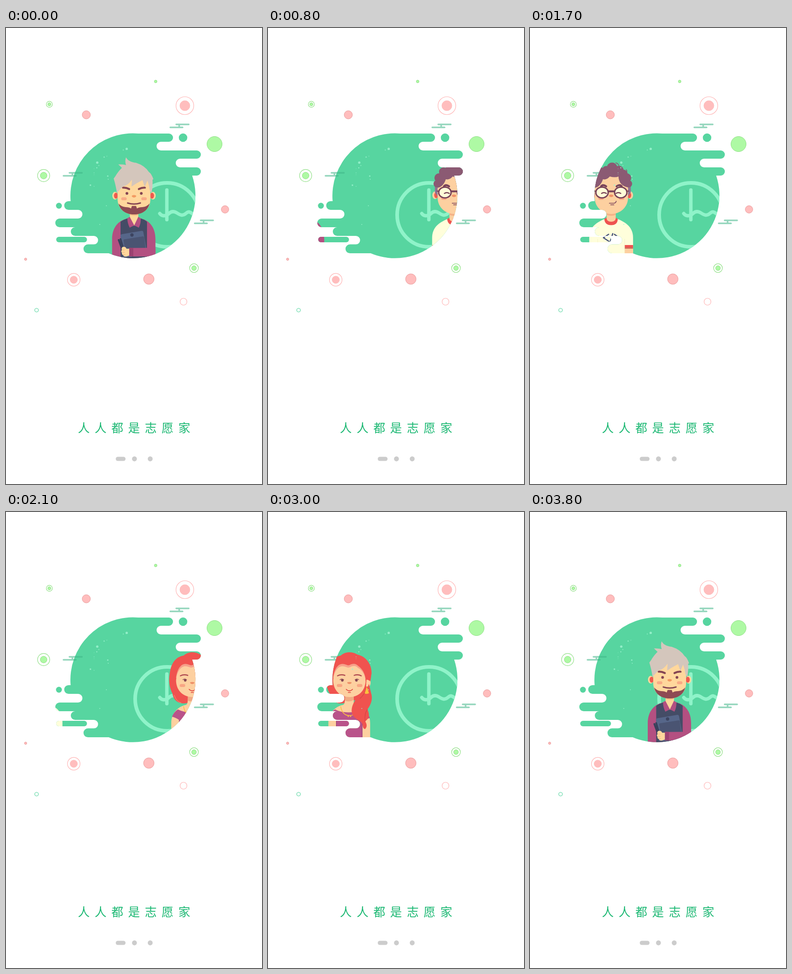
Animation, 561 px wide and 998 px high, one loop 3.9 s. Source, as an HTML page:

```html
<!DOCTYPE html>
<html lang="zh">
<head>
<meta charset="utf-8">
<style>
html, body { margin: 0; width: 100%; height: 100%; overflow: hidden; background: #fff; }
svg { display: block; width: 561px; height: 998px; }
text { font: 100 26px "Noto Sans CJK SC", "Noto Sans CJK", sans-serif; fill: #1cb873; text-anchor: middle; }
.line { fill: none; stroke-linecap: round; stroke-linejoin: round; }
</style>
</head>
<body>
<svg viewBox="0 0 561 998">
  <defs>
    <clipPath id="blob">
      <path id="shape" d="M290 231H357a9 9 0 0 1 0 18H339.5a9.5 9.5 0 0 0 0 19H418a9 9 0 0 1 0 18H381.5a9.5 9.5 0 0 0 0 19H418a9 9 0 0 1 0 18H408A137 137 0 0 1 225 493H179.5a9.7 9.7 0 0 1 0-19.4H192.5a9.3 9.3 0 0 0 0-18.6H151.500a9.500 9.500 0 0 1 0-19H117.500a9.500 9.500 0 0 1 0-19H158a9.500 9.500 0 0 0 0-19H137a9.500 9.500 0 0 1 0-19H141.600A137 137 0 0 1 290 231Z"/>
      <rect id="bar" x="110" y="457" width="67.500" height="12" rx="6"/>
      <circle id="dotL" cx="116" cy="389" r="6.500"/>
      <circle id="dotR" cx="388" cy="240" r="9.300"/>
    </clipPath>
  </defs>
  <g id="dots"></g>
  <g fill="#57d5a0">
    <use href="#shape"/><use href="#bar"/><use href="#dotL"/><use href="#dotR"/>
  </g>
  <g id="clouds" class="line" stroke="#3fb488" stroke-width="3.500"></g>
  <g clip-path="url(#blob)">
    <g class="line" stroke="#8ff3c9" stroke-width="8">
      <circle cx="353" cy="409" r="70"/>
      <path stroke-width="7.500" d="M352.500 354.500V419.500M337 406C342 413 351 412 357 406S369 401 375 405S387 412 394 406S404 403 409 407"/>
    </g>

    <g class="person">
      <path fill="#b35081" d="M232.500 510V462C232.500 438 245 423 262 418L271 414H290L299 418C316 423 327.500 438 327.500 462V510Z"/>
      <path fill="#444c66" d="M251 510V424Q258 419 266 417L273 434 281 432 288 434 296 417Q303 419 309 424V510Z"/>
      <path fill="#ffd79c" d="M271.500 400H290V415L281 433 271.500 415Z"/>
      <path fill="#f4bd85" d="M271.500 404H290V409Q281 413 271.500 409Z"/>
      <path fill="#b35081" d="M266 417L271 413 281 432 271 437Q266 427 266 417ZM295 417L290 413 281 432 291 437Q296 427 295 417Z"/>
      <g fill="#ffd79c"><ellipse cx="239" cy="367" rx="6" ry="8.500"/><ellipse cx="322" cy="367" rx="6" ry="8.500"/></g>
      <g fill="#ef5a4f"><ellipse cx="241" cy="367" rx="4.500" ry="6.500"/><ellipse cx="320" cy="367" rx="4.500" ry="6.500"/></g>
      <path fill="#ffd79c" d="M244.500 330H316.500V374C316.500 396 300 408 280.500 408S244.500 396 244.500 374Z"/>
      <path fill="#8e4a53" d="M246.500 384Q252 391 262 392 270 392 274 395L276 389.500H285L287 395Q291 392 299 392 309 391 314.500 384C311 400 297 408 280.500 408S250 400 246.500 384Z"/>
      <path fill="#d4c6bc" d="M243 361Q241 346 236 329.500L240 324Q245 315 254 306L246 298.500Q255 298 263 300 260 291 263 283 268 293 285 295 304 301 313 315 319 319 323 331L321 332Q322 346 319 361L315 355Q314 345 310 334L304 348 299 333Q287 339 275 347L276 332Q267 345 256 347 249 354 243 361Z"/>
      <g class="line" stroke="#854553">
        <path stroke-width="4.200" d="M256.500 349.500Q263 349 270 352.500M291 352.500Q298 349 304.500 349.500"/>
        <path stroke-width="3" d="M266.500 383Q280.500 387.500 294.500 383"/>
      </g>
      <g fill="#854553"><circle cx="265" cy="362" r="3"/><circle cx="296.500" cy="362" r="3"/></g>
      <path fill="#f39b62" d="M275.500 368Q276 365.500 280.500 365.500T285.500 368Q284 371 280.500 371T275.500 368Z"/>
      <g fill="#f8ab86"><rect x="252.500" y="370.500" width="12" height="6.500" rx="3.200"/><rect x="296.500" y="370.500" width="12" height="6.500" rx="3.200"/></g>
      <path fill="#566689" d="M250.500 455Q250.500 452 253 451.500L297 444Q300.500 443.500 301 447L308 485 275 501H257Z"/>
      <path fill="#4a5472" d="M257.500 464.500Q257.500 463 259 462.500L300 456Q302 456 302.500 457.500L306 483 261 486Z"/>
      <circle cx="276" cy="453" r="3.700" fill="#3c4460"/>
      <path class="line" stroke="#39415c" stroke-width="4" d="M247 464L254 483M251 462L256 479"/>
      <path fill="#b35081" d="M270 481.500L327.500 481V500H270Z"/>
      <path fill="#9c4271" d="M270 481H279V500H270Z"/>
      <path fill="#ffd79c" d="M270 483H264Q262 478 256 479 252 481 254 486 251 489 254 492 253 496 257 497 258 501 264 500L270 498Z"/>
      <path class="line" stroke="#efb27e" d="M255 486H260M255 491H260M257 496H261"/>
    </g>

    <g class="person">
      <path fill="#fffedb" d="M232 510V459C232 436 248 425 266 418H294C312 425 328 436 328 459V510Z"/>
      <path fill="#fdd0a0" d="M232 483H251V510H232ZM309 483H328V510H309Z"/>
      <path fill="#ef5350" d="M232 475H251V480H232ZM309 475H328V480H309Z"/>
      <path fill="#d06a58" d="M232 480H251V483H232ZM309 480H328V483H309Z"/>
      <path class="line" stroke="#f5f2c8" d="M250.500 462V504M309.500 462V504"/>
      <path fill="#ef5350" d="M265 418L270 415H290L294.500 418Q294 431.500 280 431.500T265 418Z"/>
      <path fill="#fdd0a0" d="M270 398H290V417Q289 424 280 424T270 417Z"/>
      <path fill="#f4b287" d="M270 405H290V409Q280 413 270 409Z"/>
      <g fill="#fdd0a0"><ellipse cx="238.500" cy="366" rx="6" ry="8.500"/><ellipse cx="322" cy="366" rx="6" ry="8.500"/></g>
      <g fill="#ef5a4f"><ellipse cx="241" cy="366" rx="4.500" ry="6.500"/><ellipse cx="319.500" cy="366" rx="4.500" ry="6.500"/></g>
      <path fill="#8f7392" d="M238 342H246V371L238 360ZM315 342H323V360L315 371Z"/>
      <path fill="#8b5a73" d="M246 328L262 310H300L316 328V349H246Z"/>
      <g id="curls" fill="#8b5a73"></g>
      <path fill="#fdd0a0" d="M244 350Q257 347 262 331 270 333 277 325 289 328 296 325 297 345 317 349V371C317 393 299 407 280.500 407S244 393 244 371Z"/>
      <path class="line" stroke="#8b5a73" stroke-width="1.500" d="M290 295Q297 297 297 303M249 315Q247 311 251 309M313 316Q316 313 313 310M262 329Q271 331 275 325"/>
      <g fill="#f8a583"><rect x="252" y="369" width="12" height="7" rx="3.500"/><rect x="297" y="369" width="12" height="7" rx="3.500"/></g>
      <g class="line" stroke="#784259">
        <g fill="#fffbd8" stroke-width="3"><ellipse cx="260" cy="360" rx="13.500" ry="11.800"/><ellipse cx="301" cy="360" rx="13.500" ry="11.800"/></g>
        <path stroke-width="4" stroke-linecap="butt" d="M273 357.500H288"/>
        <path stroke-width="2.500" d="M243 357H247M314 357H318M259 362Q264 358.500 269.500 362M290.500 362Q296 358.500 301 362"/>
        <path stroke-width="4.500" d="M258 346.500Q262 341.500 269 346.500M292 346.500Q299 341.500 303 346.500"/>
        <path stroke-width="1.700" d="M276 383.500H286Q290.500 383 291 379M279 387H286"/>
      </g>
      <path fill="#f09268" d="M275 367Q276 364.500 280 364.500T285 367Q284 370 280 370T275 367Z"/>
      <path class="line" stroke="#44507a" stroke-width="2.500" d="M274.500 451.500L263 459 274.500 466.500M287 451.500L298 459 287 466.500M283.500 450L277.500 468"/>
    </g>

    <g class="person">
      <path fill="#f0534f" d="M237 397C229 382 229 365 231 355 234 329 245 317 262 314 271 305 287 305 298 312 318 316 330 335 329 353L326 375 300 410 270 418C250 422 239 412 237 397Z"/>
      <path class="line" stroke="#f69a7d" d="M241 401Q245 414 256 418"/>
      <path fill="#fdd0a0" d="M234.500 510V462C234.500 440 250 425 267 422 270 420 271 417 271 400H290V420Q291 424 295 425C316 430 326 442 326 462V510Z"/>
      <path fill="#f1aa83" d="M271 402H290V411Q281 417 271 413Z"/>
      <path fill="#b9538a" d="M252 510V455.500Q245 450 236 448 241 437 249 432 262 439 280 438.500T311 432Q321 438 325.500 451L309 455.500V510Z"/>
      <path class="line" stroke="#9f4479" stroke-width="1.500" d="M252 456V504M308.500 456V504"/>
      <path class="line" stroke="#fac23e" stroke-width="1.500" d="M261.500 426Q265 445 280 445.500 285 446 288 444"/>
      <g fill="#fac23e"><circle cx="278" cy="447" r="1.500"/><circle cx="283" cy="447" r="1.500"/></g>
      <ellipse cx="322" cy="374" rx="5" ry="8" fill="#fdd0a0"/>
      <path fill="#f6a08a" d="M245 363C247 346 254 333 265 332.500 272 332 276 337 281 335 287 331 295 331 300 337 309 343 315 354 316 366Z"/>
      <path fill="#fdd0a0" d="M245 370C246 351 254 339 264 337.500 272 337 276 342 281 340 288 336 295 336 299 341 309 346 315 356 316 370 315 393 299 405 281 405S246 393 245 370Z"/>
      <path fill="#f0534f" d="M316 365Q319 374 316 385 309 398 298 406C286 420 282 436 289 446 295 455 306 456 309 464 310 470 310 474 315 475 320 470 319 464 315 458 325 452 325 442 320 432 329 420 332 408 328 396L323 375 327 366 329 350Z"/>
      <path fill="#fdd0a0" d="M318 367Q325 367 326 373 322 377 321 382L317 382Z"/>
      <path class="line" stroke="#d64747" stroke-width="1.500" d="M317 386Q315 398 304 408M320 432Q313 441 315 458"/>
      <path fill="#fac23e" d="M318.500 382L323.500 396.500Q319 399 314 397Z"/>
      <path class="line" stroke="#b04b51" stroke-width="2.400" d="M254.500 358.500Q262 354.500 270.500 357.500M291 357.500Q299 354.500 306.500 358.500"/>
      <path class="line" stroke="#854553" stroke-width="1.500" d="M260 367Q264 364 268 367M293 367Q297 364 301 367"/>
      <g fill="#854553"><circle cx="265" cy="368.500" r="2.800"/><circle cx="296" cy="368.500" r="2.800"/></g>
      <path fill="#ee9067" d="M275.500 373.500Q276 372 280.500 372T285.500 373.500Q284 376.500 280.500 376.500T275.500 373.500Z"/>
      <g fill="#f8a583"><rect x="253" y="376.500" width="12" height="6.500" rx="3.200"/><rect x="297" y="376.500" width="12" height="6.500" rx="3.200"/></g>
      <path class="line" stroke="#e0433f" stroke-width="1.700" d="M273.500 388Q280.500 395 287.500 388M278 395H283"/>
    </g>
  </g>
  <g id="stars" fill="#9df3cf" opacity=".85"></g>
  <g id="title"></g>
  <g fill="#ccc">
    <rect x="240.500" y="938.500" width="21.500" height="9" rx="4.500"/>
    <circle cx="281.500" cy="943" r="5.400"/><circle cx="316" cy="943" r="5.400"/>
  </g>
</svg>
<script>
const $ = id => document.getElementById(id);
const fill = (id, items, draw) => { $(id).innerHTML = items.map(draw).join(""); };
const disc = (x, y, r, look = "") => `<circle cx="${x}" cy="${y}" r="${r}" ${look}/>`;

const tones = {
  pink: ["#ffbdbd", "#ea9c9c", "#ffb5b5"],
  green: ["#aef9a4", "#8fdf85", "#90df86"],
  teal: ["#fff", "#57d5a0", "#57d5a0"]
};

// x, y, tone, disc radius, ring radius
fill("dots", [
  [328, 117, "green", 3], [95, 167, "green", 3.4, 6.6], [176, 190, "pink", 9],
  [392, 170, "pink", 11, 19.5], [457, 254, "green", 16.6], [82.5, 323, "green", 7.3, 13.3],
  [480, 397, "pink", 8.2], [43, 506, "pink", 2.6], [412, 525.5, "green", 5.2, 9.6],
  [148.500, 551, "pink", 8, 13.8], [313, 549.5, "pink", 11.5], [389, 599, "pink", 0, 7.5],
  [67, 617.5, "teal", 0, 4]
], ([x, y, tone, r, ring]) => {
  const [body, edge, halo] = tones[tone];
  const inner = tone === "pink" && ring ? body : edge;
  return (ring ? disc(x, y, ring, `fill="#fff" stroke="${halo}" stroke-width="1.2"`) : "") +
    (r ? disc(x, y, r, `fill="${body}" stroke="${inner}"`) : "");
});

fill("clouds", [[358, 211], [411.5, 421], [124, 317]], ([x, y]) =>
  `<path opacity=".55" d="M${x + 15} ${y}h27.500M${x + 2} ${y + 6.500}h27M${x + 21.500} ${y}v6.500"/>`);

fill("stars", [
  [264.5, 264.5, 2.6], [257, 267, 1], [215, 282.5, 1.3], [221, 280.5, .8], [200, 294.5, 2.6],
  [203.5, 301, 1], [199, 306, 1.2], [193, 308, .6], [193, 317, .8], [193, 321, .6],
  [223, 324, 1.6], [224, 331, 1], [185, 344, 1.7], [193, 346.5, .8], [220, 389, 1], [205.5, 430, 1]
], s => disc(...s));

fill("curls", [
  [243, 341, 8], [247, 328, 10], [257, 315, 10], [269, 311, 9], [282, 306, 11.5],
  [297, 312, 10.5], [307, 319, 9], [314, 328, 10], [318, 341, 8]
], c => disc(...c));

fill("title", [..."人人都是志愿家"], (ch, i) => `<text x="${170.5 + i * 36.7}" y="885">${ch}</text>`);

const people = [...document.querySelectorAll(".person")];
const LOOP = 3900, STEP = 100, GAP = 332, SPAN = GAP * people.length;

function draw(ms) {
  const t = Math.floor(ms % LOOP / STEP) * STEP;
  people.forEach((p, i) => {
    const x = (i * GAP - t / LOOP * SPAN + GAP + SPAN) % SPAN - GAP;
    p.setAttribute("transform", `translate(${x.toFixed(2)} 0)`);
  });
}

let start;
function tick(now) {
  start ??= now;
  draw(now - start);
  requestAnimationFrame(tick);
}
draw(0);
requestAnimationFrame(tick);
</script>
</body>
</html>
```
